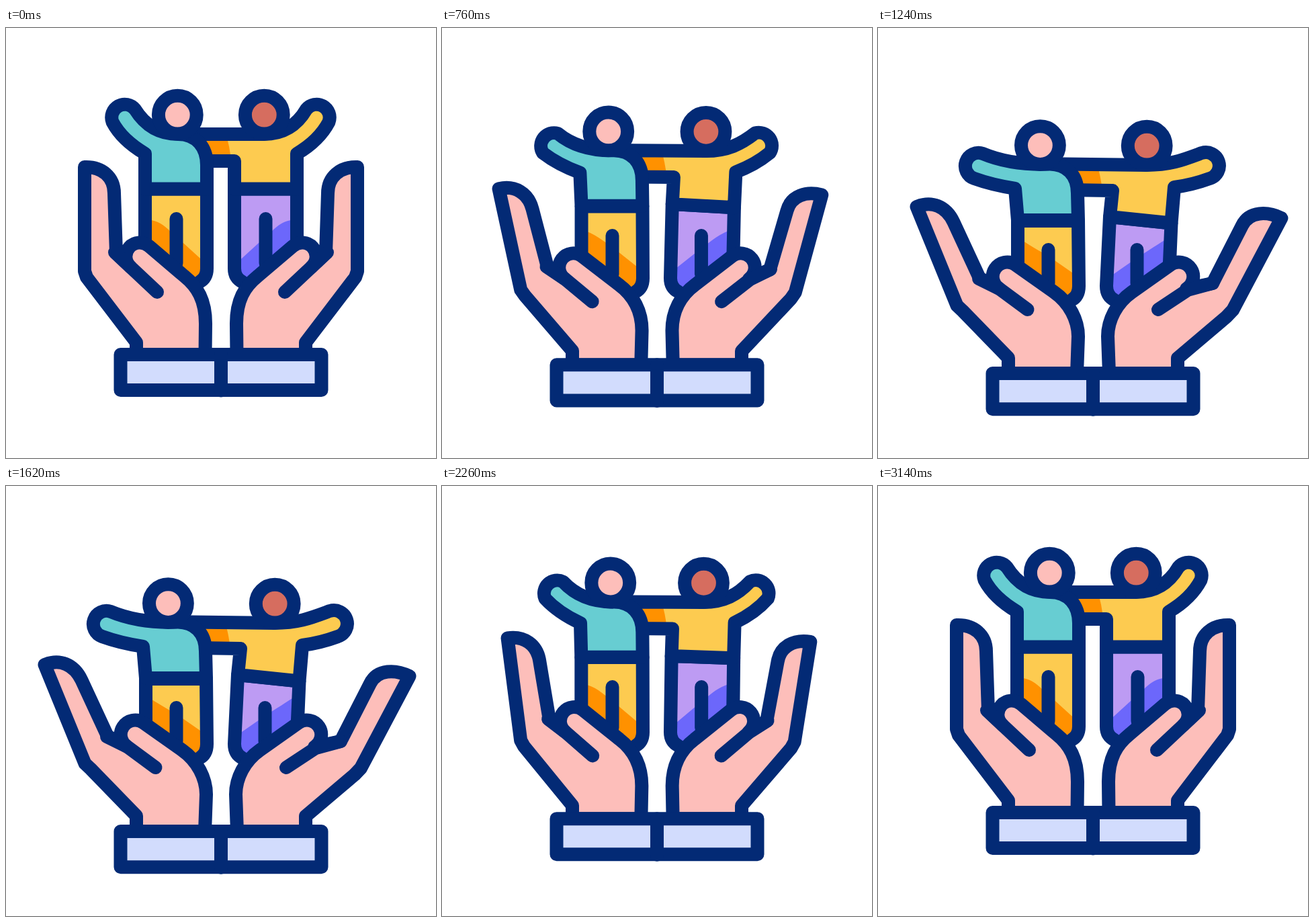
Write an HTML page that moves like this. It is 640 px wide and 640 px high and loops after 3.6 s.

```html
<!DOCTYPE html>
<html lang="en">
<head>
<meta charset="utf-8">
<title>Helping hands</title>
<style>
  html, body { margin: 0; width: 100%; height: 100%; overflow: hidden; background: #fff; }
  svg { display: block; width: 100%; height: 100%; }
</style>
</head>
<body>
<svg id="stage" viewBox="0 0 640 640" stroke-width="20" stroke-linecap="round" stroke-linejoin="round"></svg>
<script>
const NAVY = '#032a75', SKIN = '#fdbeba', BROWN = '#d66d5f', TEAL = '#67cdd2', YELLOW = '#fdcb50',
      ORANGE = '#ff9100', PURPLE = '#bd9bf3', VIOLET = '#6c67fb', CUFF = '#d2dcfd';
const LOOP = 3600;
const stage = document.getElementById('stage');
const parts = [];

function add(parent, tag, attrs) {
  const el = document.createElementNS('http://www.w3.org/2000/svg', tag);
  for (const name in attrs) el.setAttribute(name, attrs[name]);
  return parent.appendChild(el);
}

const numbers = text => text.match(/-?[\d.]+/g).map(Number);

// A path that blends between its resting and its opened shape.
function morph(rest, open, fill, stroke = NAVY, parent = stage) {
  const el = add(parent, 'path', { fill, stroke });
  parts.push({ el, rest, from: numbers(rest), to: numbers(open) });
}

const line = (rest, open, parent) => morph(rest, open, 'none', NAVY, parent);

function head(x, y, x2, y2, fill) {
  const ring = (cx, cy) => `M${cx - 28.4},${cy} A28.4,28.4 0 1 1 ${cx + 28.4},${cy} A28.4,28.4 0 1 1 ${cx - 28.4},${cy}Z`;
  morph(ring(x, y), ring(x2, y2), fill);
}

function legs(rest, open, shadeRest, shadeOpen, slitX, slitX2, color, shade) {
  morph(rest, open, color, 'none');
  morph(shadeRest, shadeOpen, shade, 'none');
  line(rest, open);
  line(`M${slitX},284 L${slitX},350`, `M${slitX2},330 L${slitX2},380`);
}

function hand(parent, open, crease) {
  morph('M194,486 L194,468 L120,371 L117,362 L117,207 C143,206 161,222 161,246 L164,335 L185.3,355.7 ' +
        'A20,20 0 0 1 212.9,324.7 L265,369 C285,385 297,405 297,440 L296.5,486Z',
        open + ' L180.5,388 A20,20 0 0 1 204,352 L262,393 C285,409 298,435 298,459 L296,514.5Z',
        SKIN, NAVY, parent);
  line('M162,334 L185.3,355.7 L225,393', crease, parent);
}

// Right person
legs('M433,345 L433,239.5 L340,239.5 L340,358 Q340,372 352,378',
     'M433,372 L436.5,290.5 L345,281 L340,384 Q340,399 352,405',
     'M435,285 C408,285 400,300 387,310 L341,352 L340,358 Q340,372 352,378 L433,345Z',
     'M436,310 C418,321 400,333 387,341 L341,373 L340,384 Q340,399 352,405 L433,372Z',
     386.5, 385.5, PURPLE, VIOLET);
const rightShirt = [
  'M285,158 L384,158 C412,158 433,145 447,121 A19.5,19.5 0 0 1 480.5,140 C471,158 455,174 433,187 ' +
  'L433,239.5 L340,239.5 L340,198 L285,198Z',
  'M276,202.5 L400,204 C436,204 455,196 482,186 A19.5,19.5 0 0 1 494,224 C475,231 458,235 441,237 ' +
  'L436.5,290.5 L345,281 L349,242 L285,241Z'];
morph(...rightShirt, YELLOW, 'none');
morph('M285,158 L327,158 Q333,175 335,198 L285,198Z',
      'M285,203 L326,203 Q331,218 334,242 L285,241Z', ORANGE, 'none');
line(...rightShirt);
head(384.3, 129.2, 400.2, 175.2, BROWN);

// Left person
legs('M207,345 L207,239.5 L299,239.5 L299,358 Q299,372 288,378',
     'M208,372 L208,287 L298,287 L299,384 Q299,399 288,405',
     'M205,285 C232,285 240,300 253,310 L299,352 L299,358 Q299,372 288,378 L207,345Z',
     'M208,312 C225,323 240,332 253,339 L299,371 L299,384 Q299,399 288,405 L208,372Z',
     253.5, 253.5, YELLOW, ORANGE);
morph('M207,239.5 L207,187 C185,174 168,158 158.5,140 A19.5,19.5 0 0 1 192,121 C207,145 228,158 256,158 ' +
      'C284,158 299,178 299,204 L299,239.5Z',
      'M208,286 L204,239 C185,236 165,232 143,224 A19.5,19.5 0 0 1 156,187 C180,197 215,204 256,202.5 ' +
      'C280,203 297,218 297,246 L298,286Z', TEAL);
head(255.3, 129.2, 241.4, 174.6, SKIN);

// Hands and cuffs
hand(stage,
     'M194,514.5 L194,491 L126,421 L117.5,413 L57.5,266 C80,257 101,265 112.5,289 L151,372',
     'M150,373 L180.5,388 L222.5,419');
hand(add(stage, 'g', { transform: 'matrix(-1 0 0 1 640 0)' }),
     'M194,514.5 L194,491.5 L121.5,430 L112,420 L39.5,283 C60,273 87,272 98,294 L142,380',
     'M142,380 L179,390 L223,419');
morph('M170.5,486 L469.5,486 L469.5,539 L170.5,539Z', 'M170.5,514 L469.5,514 L469.5,567.2 L170.5,567.2Z', CUFF);
line('M320,486 L320,539.5', 'M320,514 L320,567.7');

// How far the hands are opened: [time in ms, amount]
const KEYS = [[180, 0], [400, .02], [540, .092], [740, .505], [980, .915], [1180, .99], [1400, 1.012],
              [1620, 1], [1820, .95], [2260, .328], [2360, .22], [2580, .073], [2900, .008], [3140, 0]];
const slope = i => (KEYS[i + 1][1] - KEYS[i][1]) / (KEYS[i + 1][0] - KEYS[i][0]);
const tangents = KEYS.map((key, i) => {
  if (i === 0 || i === KEYS.length - 1) return 0;
  const a = slope(i - 1), b = slope(i);
  return a * b <= 0 ? 0 : 2 * a * b / (a + b);
});

// Monotone cubic through the keys.
function openness(t) {
  const i = KEYS.findIndex(key => key[0] > t) - 1;
  if (i < 0) return 0;
  const [t0, y0] = KEYS[i], [t1, y1] = KEYS[i + 1];
  const d = t1 - t0, u = (t - t0) / d, v = 1 - u;
  return y0 * v * v * (1 + 2 * u) + y1 * u * u * (3 - 2 * u)
       + d * u * v * (tangents[i] * v - tangents[i + 1] * u);
}

function draw(t) {
  const p = openness(t);
  for (const { el, rest, from, to } of parts) {
    let i = 0;
    el.setAttribute('d', rest.replace(/-?[\d.]+/g, () => {
      const value = from[i] + (to[i] - from[i]) * p;
      i++;
      return +value.toFixed(3);
    }));
  }
}

function tick() {
  draw(performance.now() % LOOP);
  requestAnimationFrame(tick);
}
tick();
</script>
</body>
</html>
```
